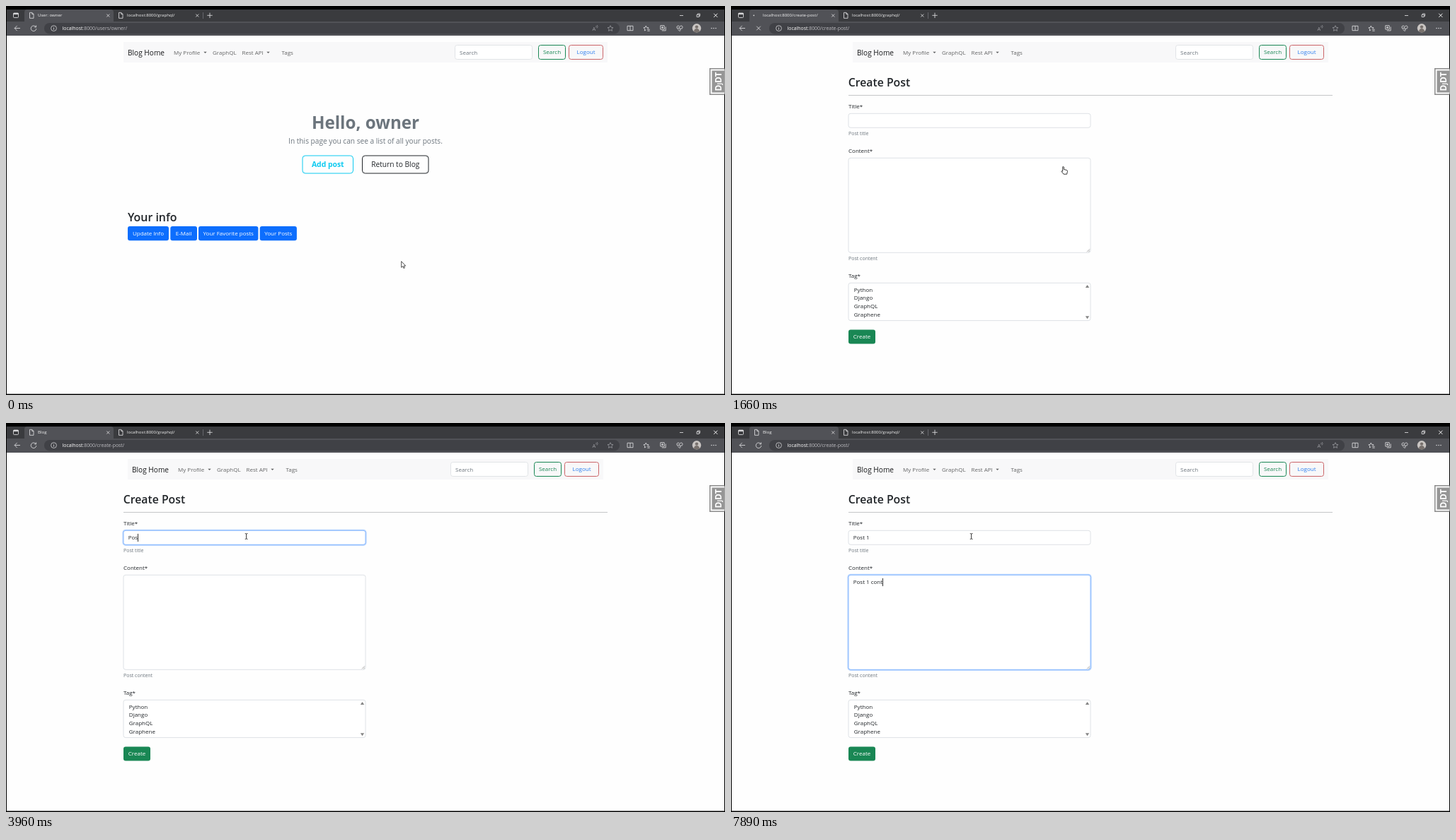
An HTML page with a canvas for the animation above (8 s loop, 1016 px wide and 551 px high).

```html
<!DOCTYPE html>
<html lang="en">
<head>
<meta charset="utf-8">
<title>Create a blog post</title>
<style>
  html, body { margin: 0; width: 100%; height: 100%; overflow: hidden; background: #000; }
  canvas { display: block; }
</style>
</head>
<body>
<canvas id="stage" width="1016" height="551"></canvas>
<script>
const LOOP = 8000;
const ctx = document.getElementById('stage').getContext('2d');
const INK = '#212529', MUTED = '#6c757d', BLUE = '#0d6efd', CYAN = '#0dcaf0', GREEN = '#198754';
const CHROME_ICON = '#d6d6d8';

// ---------- drawing helpers ----------
function text(str, x, y, size, color = INK, { weight = 400, align = 'left' } = {}) {
  ctx.font = `${weight} ${size}px "Open Sans", "Noto Sans", sans-serif`;
  ctx.textAlign = align;
  ctx.fillStyle = color;
  ctx.fillText(str, x, y);
  return ctx.measureText(str).width;
}

function rect(x, y, w, h, color) {
  ctx.fillStyle = color;
  ctx.fillRect(x, y, w, h);
}

function box(x, y, w, h, r, fill, stroke, width = 1) {
  ctx.beginPath();
  ctx.roundRect(x, y, w, h, r);
  if (fill) { ctx.fillStyle = fill; ctx.fill(); }
  if (stroke) { ctx.strokeStyle = stroke; ctx.lineWidth = width; ctx.stroke(); }
}

function path(d, x, y, { fill, stroke, width = 1 } = {}) {
  const shape = new Path2D(d);
  ctx.save();
  ctx.translate(x, y);
  ctx.lineJoin = 'round';
  if (fill) { ctx.fillStyle = fill; ctx.fill(shape); }
  if (stroke) { ctx.strokeStyle = stroke; ctx.lineWidth = width; ctx.stroke(shape); }
  ctx.restore();
}

function circle(x, y, r, fill, stroke) {
  ctx.beginPath();
  ctx.arc(x, y, r, 0, Math.PI * 2);
  if (fill) { ctx.fillStyle = fill; ctx.fill(); }
  if (stroke) { ctx.strokeStyle = stroke; ctx.lineWidth = 0.8; ctx.stroke(); }
}

const icon = (d, x, y, color = CHROME_ICON, width = 0.9) => path(d, x, y, { stroke: color, width });

// ---------- timing helpers ----------
const clamp = v => Math.min(1, Math.max(0, v));
const smooth = u => u * u * (3 - 2 * u);
const mix = (a, b, u) => a + (b - a) * u;
const stepped = (t, start, interval, count) => clamp((Math.floor((t - start) / interval) + 1) / count);
const within = (t, a, b) => t >= a && t < b;
const latest = (t, states) => states.filter(s => t >= s[0]).pop()[1];

// ---------- browser window ----------
const CROSS = 'M-2-2L2 2M2-2L-2 2';
const PAGE = 'M-2.5-4H.8L3-1.8V4H-2.5ZM.8-4V-1.8H3';
const STAR = 'M0-4L1.2-1.4L4-1.1L1.9.8L2.5 3.6L0 2.2L-2.5 3.6L-1.9.8L-4-1.1L-1.2-1.4Z';

function chrome(t) {
  const created = t >= 1590, loading = within(t, 1460, 1730);
  rect(0, 0, 1016, 551, '#000');
  rect(1, 5, 1014, 17, '#3a3b3e');
  rect(1, 22, 1014, 20, '#515257');
  box(26, 5, 126, 18, [4, 4, 0, 0], '#515257');

  box(10.5, 10, 7, 6.5, 1, null, CHROME_ICON, 0.9);
  rect(10.5, 10, 7, 2, CHROME_ICON);

  if (loading) circle(32.3, 13.3, 0.9, '#ddd');
  else icon(PAGE, 36, 13.3);
  const title = !created ? 'User: owner' : loading ? 'localhost:8000/create-post/' : 'Blog';
  text(title, 45, 15.4, 6.1, '#f2f2f2');
  icon(CROSS, 144.3, 13.5);
  icon(PAGE, 162, 13.3);
  text('localhost:8000/graphql/', 171, 15.4, 6.1, '#f2f2f2');
  icon(CROSS, 270.3, 13.5);
  rect(278, 9, 1, 9, '#66676b');
  icon('M-3.7 0H3.7M0-3.7V3.7', 288, 13.3);

  icon('M-2.5 0H2.5', 954.5, 13.5);
  icon('M-2.2-1H1V2.2H-2.2ZM-1-1V-2.3H2.3V1H1', 978.3, 13.3);
  icon('M-2.6-2.6L2.6 2.6M2.6-2.6L-2.6 2.6', 1002.8, 13.3, '#fff');

  icon('M4 0H-3.8M-.3-3.6L-3.9 0L-.3 3.6', 16, 31.5);
  if (loading) icon('M-2.8-2.8L2.8 2.8M2.8-2.8L-2.8 2.8', 39, 31.5);
  else icon('M3.2-1.8A3.8 3.8 0 1 0 3.8.6M3.6-4V-1.6H1.2', 39, 31.5);

  box(54, 24, 813, 15.5, 7.5, '#404146');
  circle(67.5, 31.6, 3.9, null, CHROME_ICON);
  icon('M0-.5V2M0-2V-1.2', 67.5, 31.6);
  const host = text('localhost', 79.5, 34.2, 6.9, '#fff');
  text(created ? ':8000/create-post/' : ':8000/users/owner/', 79.5 + host, 34.2, 6.9, '#bcbcc0');

  const dim = '#9a9ba0';
  text('A', 828.5, 34.8, 7.5, dim);
  icon('M0-2Q1.3-.8 0 .6M1.6-3Q3.5-.8 1.6 1.4', 833.6, 30, dim, 0.7);
  icon(STAR, 854, 31.7, dim, 0.8);
  icon('M-4-3.2H4V3.2H-4ZM0-3.2V3.2', 882, 31.5);
  icon('M-1-3.6L.2-1.1L2.8-.8L1 1M-1-3.6L-2.1-1.1L-4.4-.8L-2.5 1L-3 3.4L-1 2.3M1 1.6H4.4M1 3.6H4.4', 905.3, 31.6);
  icon('M-3.8-3.8H1.6V1.6H-3.8ZM-1.8 3.4H3.6V-2M-1.1-2.6V.4M-2.6-1.1H.4', 928.6, 31.5);
  icon('M-3.8 0Q-5-3-2.3-3.5Q-.6-3.4 0-2Q.6-3.4 2.3-3.5Q5-3 3.6 0M-3.8.2H-1.6L-.6-1.4L.6 2L1.5.4H3.6M-2.8 1.4L0 4L1.6 2.5', 952, 31.5);
  circle(976, 31.3, 6.2, '#c9c5c2');
  circle(976, 29.6, 2.2, '#77706c');
  path('M-4 4.6Q-3.5.8 0 .8Q3.5.8 4 4.6Q0 7.6-4 4.6Z', 976, 31.3, { fill: '#77706c' });
  [-3, 0, 3].forEach(dx => circle(1000 + dx, 31.5, 0.8, CHROME_ICON));

  rect(1, 42, 1014, 507.5, '#fefefe');
}

function debugHandle() {
  rect(994, 88, 21.5, 38, '#8b8b8b');
  rect(995.5, 89.5, 20, 35, '#fff');
  rect(997.5, 91.5, 17.5, 31, '#969696');
  ctx.save();
  ctx.translate(1011, 120.5);
  ctx.rotate(-Math.PI / 2);
  let x = 0;
  for (const [letters, size] of [['D', 12], ['J', 8], ['DT', 12]])
    x += text(letters, x, 0, size, '#fff', { weight: 700 });
  ctx.restore();
}

// ---------- page parts ----------
function button(label, x, y, w, h, { fill, stroke, color = '#fff', size = 8, weight = 400, r = 3 }) {
  box(x, y, w, h, r, fill, stroke);
  text(label, x + w / 2, y + h / 2 + size * 0.36, size, color, { weight, align: 'center' });
}

function navbar(inset) {
  const left = 166 + inset, right = 850 - inset, grey = '#646566';
  rect(left, 51, right - left, 29, '#f8f8f9');
  text('Blog Home', left + 6, 69.7, 10.1, '#17181a');
  [['My Profile', 71], ['GraphQL', 126], ['Rest API', 167.5], ['Tags', 223.5]]
    .forEach(([label, dx]) => text(label, left + dx, 68.8, 8, grey));
  [115.5, 204.5].forEach(dx => path('M-2.2-1.1H2.2L0 1.2Z', left + dx, 65.9, { fill: grey }));
  box(right - 215.5, 55.5, 109, 20, 3, '#fff', '#e1e4e7');
  text('Search', right - 209, 68.8, 8, MUTED);
  button('Search', right - 97.5, 55.5, 38, 20, { stroke: GREEN, color: GREEN });
  button('Logout', right - 54.5, 55.5, 48, 20, { stroke: '#cb6468', color: '#2b7df0' });
}

function mix3(a, b, u) {
  return `rgb(${a.map((v, i) => Math.round(mix(v, b[i], u)))})`;
}

function profilePage(t) {
  navbar(0);
  text('Hello, owner', 508, 173.5, 24.2, MUTED, { weight: 700, align: 'center' });
  text('In this page you can see a list of all your posts.', 508, 195.4, 10.15, MUTED, { align: 'center' });
  const hover = stepped(t, 1120, 70, 2);
  button('Add post', 419, 212, 71.5, 25, {
    stroke: CYAN, size: 10.4, weight: 700, r: 4,
    fill: hover ? `rgba(13,202,240,${hover})` : null,
    color: mix3([13, 202, 240], [0, 0, 0], hover)
  });
  button('Return to Blog', 503.5, 212, 93.5, 25, { stroke: INK, color: INK, size: 10.2, r: 4 });
  text('Your info', 172, 304.6, 15.9, INK, { weight: 600 });
  [['Update Info', 172, 58], ['E-Mail', 232.3, 37.7], ['Your Favorite posts', 272, 84.4], ['Your Posts', 358.7, 52.2]]
    .forEach(([label, x, w]) => button(label, x, 312, w, 20.3, { fill: BLUE }));
}

function field(y, h, focus) {
  if (focus) box(164.4, y - 1.6, 345.2, h + 3.2, 4.5, `rgba(13,110,253,${0.27 * focus})`);
  box(166, y, 342, h, 3, '#fff', focus ? mix3([222, 226, 230], [134, 183, 254], focus) : '#dee2e6');
}

function typed(str, baseline, caretOn, selected) {
  ctx.font = '400 8px "Open Sans", "Noto Sans", sans-serif';
  const width = ctx.measureText(str).width;
  if (selected) rect(172.5, baseline - 9, width + 0.3, 12.6, '#2f8bf5');
  text(str, 172.7, baseline, 8, selected ? '#fff' : INK);
  if (caretOn) rect(Math.round(172.2 + width), baseline - 8.2, 1, 11.2, '#333');
}

function createPage(t) {
  navbar(6);
  text('Create Post', 165.7, 114.3, 15.8, INK, { weight: 600 });
  rect(166, 126, 684, 1, '#c4c6c8');

  const inContent = t >= 5950;
  text('Title*', 166, 144.7, 8);
  field(152.3, 20, inContent ? 0 : stepped(t, 2620, 70, 3));
  const title = latest(t, [[0, ''], [3630, 'P'], [3830, 'Po'], [3960, 'Pos'], [4160, 'Post'], [4360, 'Post '], [4690, 'Post 1']]);
  const selected = within(t, 5160, 5950);
  typed(title, 165.1, within(t, 2690, 3300) || within(t, 3630, 5160), selected);
  text('Post title', 166, 183, 7, MUTED);

  text('Content*', 166, 207.6, 8);
  field(215.3, 134, inContent ? 1 : 0);
  icon('M-4 0L0-4M-1.8 0L0-1.8', 507, 348.3, '#8a8a8a', 0.7);
  const content = latest(t, [[0, ''], [6480, 'Post 1'], [7080, 'Post 1 '], [7360, 'Post 1 c'], [7560, 'Post 1 co'], [7820, 'Post 1 con'], [7890, 'Post 1 cont']]);
  typed(content, 228.1, inContent && !within(t, 7030, 7080), false);
  text('Post content', 166, 359.8, 7, MUTED);

  text('Tag*', 166, 384.5, 8);
  field(392.3, 53.3, 0);
  ['Python', 'Django', 'GraphQL', 'Graphene'].forEach((tag, i) => text(tag, 173.8, 404.8 + i * 11.65, 8));
  path('M-2.7 2L0-2L2.7 2Z', 503.5, 397, { fill: '#858585' });
  path('M-2.7-2L0 2L2.7-2Z', 503.5, 441.3, { fill: '#858585' });
  button('Create', 166, 458.6, 38, 20, { fill: GREEN });
}

// ---------- pointer ----------
const ARROW = 'M0 0V8.6L2 6.9L3.3 9.8L4.7 9.2L3.4 6.4H6Z';
const HAND = 'M-2.6-5.2Q-1.6-6-.9-5V-1.5L2.9-.6Q4.4-.2 4.1 1.4L3.3 5.2H-1.2L-4.3 1.4Q-4.3.1-2.6 1.2Z';
const IBEAM = 'M-1.8-4Q0-4 0-3Q0-4 1.8-4M0-3.2V3.2M-1.8 4Q0 4 0 3Q0 4 1.8 4';

function halo(x, y) {
  circle(x, y, 6.2, 'rgba(255,238,0,.7)');
}

function pointer(t) {
  if (t < 1120) {
    const u = smooth(stepped(t, 720, 67, 8) * (t >= 720));
    path(ARROW, mix(558.7, 469, u ** 1.2), mix(361.7, 227, u ** 0.7), { fill: '#fff', stroke: '#222', width: 0.8 });
  } else if (t < 1990) {
    const settle = t < 1190 ? 1 : 0;
    if (within(t, 1390, 1530)) halo(469.5, 227.5);
    path(HAND, 471.3 + settle * 5, 233 + settle * 4, { fill: '#fff', stroke: '#222', width: 0.9 });
  } else {
    const u = smooth(stepped(t, 1990, 70, 8));
    const x = mix(470, 339.6, u), y = mix(228, 160.5, u);
    if (within(t, 2620, 2830)) halo(x - 0.8, y - 0.4);
    icon(IBEAM, x, y, '#222', 0.9);
  }
}

function frame(now) {
  const t = now % LOOP;
  chrome(t);
  if (t < 1590) profilePage(t);
  else createPage(t);
  debugHandle();
  pointer(t);
  requestAnimationFrame(frame);
}
requestAnimationFrame(frame);
</script>
</body>
</html>
```
